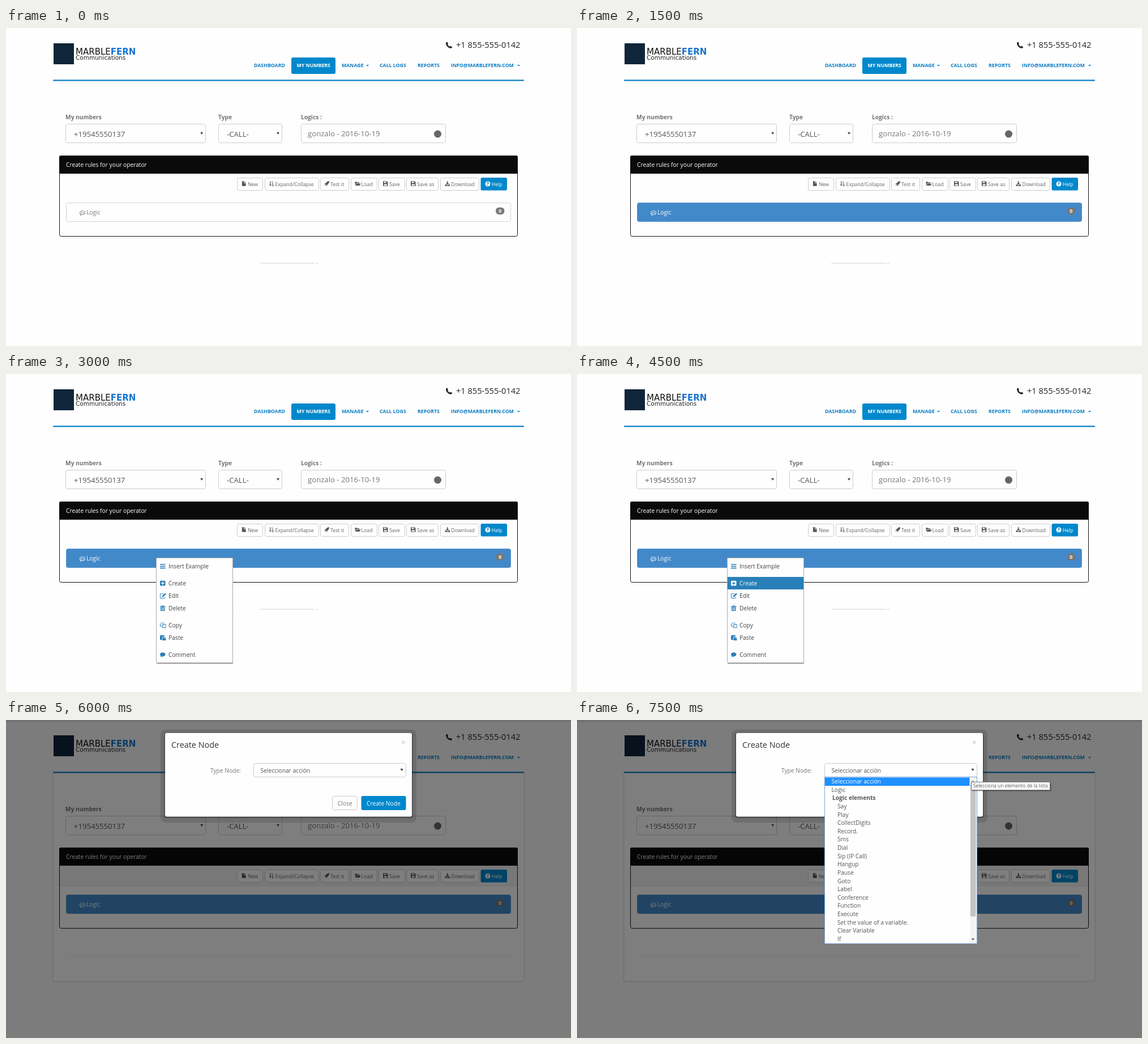
These frames come from a looping animation (998 px wide and 561 px high, 8000 ms). An HTML page:

```html
<!DOCTYPE html>
<html lang="en">
<head>
<meta charset="utf-8">
<title>Call rules</title>
<style>
html, body { margin: 0; width: 100%; height: 100%; overflow: hidden; background: #fefefe; }
svg { display: block; width: 998px; height: 561px; font-family: "Open Sans", sans-serif; }
text { white-space: pre; }
.wordmark { font-family: "DejaVu Sans", sans-serif; }
</style>
</head>
<body>
<svg id="stage" viewBox="0 0 998 561"></svg>
<script>
const BODY = 10.23, SMALL = 8.77, LARGE = 13.15;
const BLUE = '#0088cc', MENU_BLUE = '#2980b9', GREY = '#777';

// Icons live in a box of about 10 by 10 units.
const ICONS = {
  file: 'M1 0H5V4H9V10H1ZM6 0L9 3H6Z',
  sort: 'M2 0H3.4V7H5L2.7 10 .4 7H2ZM6 0H7.5V1.5H6ZM6 2.8H8.3V4.3H6ZM6 5.6H9.2V7.1H6ZM6 8.4H10V9.9H6Z',
  rocket: 'M10 0C6 0 4.3 1.8 3 4L1.3 4.3 0 6.6 2.2 6.2 3.9 7.9 3.5 10 5.8 8.7 6 7C8.2 5.7 10 4 10 0ZM1.7 7L3 8.4 .3 9.7Z',
  folder: 'M0 8V1H3.5L4.5 2.2H9V4H2.6ZM.3 9L3 4.8H12L9.3 9Z',
  save: 'M0 0H8L10 2V10H0ZM2.2 .9V3.7H7.2V.9ZM2 6V9.1H8V6ZM5.3 1.3H6.6V3.2H5.3Z',
  download: 'M4 0H6V4H8.5L5 7.5 1.5 4H4ZM0 6.7H2.5L5 9 7.5 6.7H10V10H0Z',
  bars: 'M0 1H10V2.6H0ZM0 4.3H10V5.9H0ZM0 7.6H10V9.2H0Z',
  plus: 'M1.5 .5H8.5Q10 .5 10 2V8Q10 9.5 8.5 9.5H1.5Q0 9.5 0 8V2Q0 .5 1.5 .5ZM4.2 2.2V4.2H2V5.8H4.2V7.8H5.8V5.8H8V4.2H5.8V2.2Z',
  edit: 'M7 1H1.5Q0 1 0 2.5V8.5Q0 10 1.5 10H7.5Q9 10 9 8.5V6.5L8 7.5V9H1V2H6ZM9.5 0L11.5 2 6 7.3H4V5.3Z',
  trash: 'M3 0H7V1.2H10V2.4H0V1.2H3ZM1 3H9V10H1ZM2.6 4V9H3.5V4ZM4.6 4V9H5.5V4ZM6.5 4V9H7.4V4Z',
  copy: 'M3 0H7V3H11V10H4V7.5H0V3ZM3.2 1L1 3.2V6.6H4V5.4L6.1 3V1ZM7.1 4L5 6.2V9.1H10V4Z',
  paste: 'M0 .8H2.5V0H6V.8H8.5V3H4V9H0ZM4.8 3.8H8V6.5H11V10H4.8ZM8.6 3.8L11 6H8.6Z',
  comment: 'M5 1C8 1 10 2.5 10 4.7S8 8.4 5 8.4L4 8.3C3 9.2 2 9.6 .8 9.7Q1.8 8.7 1.9 7.6C.7 7 0 6 0 4.7 0 2.5 2 1 5 1Z',
  talk: 'M5 1C8 1 10 2.5 10 4.7S8 8.4 5 8.4L4 8.3C3 9.2 2 9.6 .8 9.7Q1.8 8.7 1.9 7.6C.7 7 0 6 0 4.7 0 2.5 2 1 5 1ZM5 1.9C2.5 1.9 .9 3.1 .9 4.7Q.9 6.2 2.8 7.1L2.6 8.2 3.7 7.4C7 7.9 9.1 6.5 9.1 4.7 9.1 3.1 7.5 1.9 5 1.9ZM2.3 4H3.7V5.4H2.3ZM4.3 4H5.7V5.4H4.3ZM6.3 4H7.7V5.4H6.3Z',
  phone: 'M2 0L3.7 2.8 2.6 4Q3.8 6.4 6 7.5L7.2 6.3 10 8Q9.8 10 7.6 10C4 9.8 .2 6 0 2.4Q0 .3 2 0Z'
};

const text = (x, y, value, size = BODY, fill = GREY, weight = 400, extra = '') =>
  `<text x="${x}" y="${y}" font-size="${size}" fill="${fill}" font-weight="${weight}" ${extra}>${value}</text>`;
const rect = (x, y, w, h, fill, extra = '') =>
  `<rect x="${x}" y="${y}" width="${w}" height="${h}" fill="${fill}" ${extra}/>`;
const box = (x, y, w, h, stroke = '#ccc', fill = '#fefefe', radius = 3) =>
  rect(x + .5, y + .5, w - 1, h - 1, fill, `stroke="${stroke}" rx="${radius}"`);
const icon = (name, x, y, fill, scale = .9) =>
  `<path d="${ICONS[name]}" fill="${fill}" fill-rule="evenodd" transform="translate(${x} ${y}) scale(${scale})"/>`;
const arrow = (x, y, fill, half = 2.5, height = 4) =>
  `<path d="M${x - half} ${y}h${2 * half}l${-half} ${height}z" fill="${fill}"/>`;
const group = (id, content) => `<g id="${id}">${content}</g>`;

function header() {
  const links = [[438, 'DASHBOARD'], [593, 'MANAGE'], [660, 'CALL LOGS'], [727, 'REPORTS'], [786, 'INFO@MARBLEFERN.COM']];
  return rect(84, 27, 36, 37, '#10253a') +
    text(123, 47, 'MARBLE<tspan fill="#1674cf" font-weight="700">FERN</tspan>', 15, '#111', 400, 'class="wordmark"') +
    text(123, 56, 'Communications', 10.5, '#222', 400, 'class="wordmark"') +
    icon('phone', 777, 24.5, '#222', 1.12) +
    text(795, 35, '+1 855-555-0142', 14.61, '#222') +
    rect(504, 52, 78, 29, BLUE, 'rx="3"') + text(513.5, 69.2, 'MY NUMBERS', SMALL, '#fff', 700) +
    links.map(([x, label]) => text(x, 69.2, label, SMALL, '#0b7dc4', 700)).join('') +
    arrow(638.5, 65, BLUE, 2.5, 2.8) + arrow(905.5, 65, BLUE, 2.5, 2.8) +
    rect(83, 91.3, 832, 2.2, '#0a80c5', 'rx="1"');
}

function filters() {
  return text(105, 161, 'My numbers', BODY, '#737373', 700) +
    text(375, 161, 'Type', BODY, '#737373', 700) +
    text(521, 161, 'Logics :', BODY, '#737373', 700) +
    box(105, 169, 248, 34) + text(120, 191.7, '+19545550137', LARGE, '#555') + arrow(345.7, 184, '#444') +
    box(375, 169, 113, 34) + text(390, 191.7, '-CALL-', LARGE, '#555') + arrow(480.5, 184, '#444') +
    box(521, 169, 256, 34) + text(533, 190.7, 'gonzalo - 2016-10-19', LARGE) +
    '<circle cx="762.5" cy="187" r="6.5" fill="#666"/>';
}

function toolbar() {
  const buttons = [
    [408, 46, 'file', 416, 427, 'New'], [457, 96, 'sort', 464.5, 475.5, 'Expand/Collapse'],
    [555, 51, 'rocket', 562.5, 573, 'Test it'], [609, 47, 'folder', 616.5, 627.5, 'Load'],
    [658, 47, 'save', 666, 677, 'Save'], [707, 57, 'save', 715, 726, 'Save as'],
    [767, 69, 'download', 775.5, 786.3, 'Download']
  ];
  return buttons.map(([x, w, name, iconX, textX, label]) =>
    box(x, 264, w, 23) + icon(name, iconX, 270.3, '#555', .85) + text(textX, 278.6, label, SMALL, '#666')).join('') +
    rect(838.5, 264, 46.5, 22.5, BLUE, 'rx="2.5"') +
    '<circle cx="851" cy="275" r="4.5" fill="#fff"/>' + text(848.9, 278, '?', 8, BLUE, 800) +
    text(857.7, 278.6, 'Help', SMALL, '#fff');
}

function panel() {
  return box(94, 225, 810, 143, '#111', 'none') +
    '<path d="M94 257V228Q94 225 97 225H901Q904 225 904 228V257Z" fill="#0a0a0a"/>' +
    text(106, 244.7, 'Create rules for your operator', BODY, '#fff') + toolbar();
}

function logicRow(fill, stroke, ink) {
  return box(106, 308, 786, 34, stroke, fill) +
    icon('talk', 130, 321.2, ink, 1) + text(142, 328.7, 'Logic', BODY, ink) +
    rect(865, 316.5, 15.5, 12.5, GREY, 'rx="6.2"') + text(870.2, 326, '0', SMALL, '#fff', 700);
}

const MENU = [
  [339, 'bars', 'Insert Example'], [369, 'plus', 'Create'], [391, 'edit', 'Edit'], [413, 'trash', 'Delete'],
  [443, 'copy', 'Copy'], [465, 'paste', 'Paste'], [495, 'comment', 'Comment']
];
const menuItem = ([y, name, label], iconFill, ink) =>
  icon(name, 272, y - 4.6, iconFill, .95) + text(287, y + 3.7, label, BODY, ink);

function contextMenu() {
  return rect(264.5, 414.5, 138, 1, '#ddd') + rect(264.5, 459.5, 138, 1, '#e4e4e4') +
    rect(266, 326, 135, 185, '#888', 'rx="1"') + box(265, 324, 136, 186, '#aaa', '#fefefe', 1) +
    MENU.map(item => menuItem(item, MENU_BLUE, '#444')).join('');
}

function modal() {
  return rect(0, 0, 998, 561, '#000', 'opacity=".5"') +
    rect(273, 17, 452, 164, '#000', 'opacity=".13" rx="9"') +
    rect(279.5, 23, 439, 150, '#000', 'opacity=".35" rx="4"') +
    rect(281, 23, 436, 147.5, '#fefefe', 'rx="3"') +
    text(292, 48.8, 'Create Node', 14.4, '#333') + text(698.3, 44.2, '×', 12.5, '#bbb') +
    text(361, 92.8, 'Type Node:') +
    box(437, 76, 270, 25) + text(449.5, 92.8, 'Seleccionar acción', BODY, '#555') + arrow(699, 86, '#333') +
    box(576, 134, 45, 25) + text(585.7, 150.5, 'Close') +
    rect(627.5, 134, 79, 25, BLUE, 'rx="3"') + text(637, 150.5, 'Create Node', BODY, '#fff');
}

function dropdown() {
  const children = ['Say', 'Play', 'CollectDigits', 'Record.', 'Sms', 'Dial', 'Sip (IP Call)', 'Hangup', 'Pause', 'Goto',
    'Label', 'Conference', 'Function', 'Execute', 'Set the value of a variable.', 'Clear Variable', 'If'];
  const baseline = row => 112.2 + row * 14.61;
  return box(437, 100, 270, 295, '#7fa6dc', '#fefefe', 0) +
    rect(438, 101.5, 255.5, 14.6, '#1e90ff') + text(449.5, baseline(0), 'Seleccionar acción', BODY, '#fff') +
    text(449.5, baseline(1), 'Logic', BODY, '#555') + text(451, baseline(2), 'Logic elements', BODY, '#555', 700) +
    children.map((label, i) => text(460, baseline(i + 3), label, BODY, '#555')).join('') +
    rect(694, 101, 12, 293, '#f3f3f3') + rect(695, 114, 9.5, 232.5, '#c4c4c4') +
    arrow(699.5, 109, '#aaa', 2.5, -3) + arrow(699.5, 385.5, '#444', 2.8, 3) +
    rect(698, 111, 139.5, 14.5, '#000', 'opacity=".35"') + box(696, 109, 140, 15, '#777', '#fff', 0) +
    text(700, 119.4, 'Selecciona un elemento de la lista', 8.35, '#555');
}

// Faint page surfaces that only show while the page is dimmed.
const surfaces = rect(0, 0, 998, 561, '#fafafa') + rect(0, 0, 998, 3, '#e2e2e2') +
  rect(82.5, 93, 833, 368, '#fdfdfd', 'stroke="#e6e6e6" stroke-width="2" rx="3"') +
  rect(95, 257, 808, 36, '#f2f2f2') + rect(95, 292.5, 808, 1, '#e4e4e4') + rect(107, 414.5, 785, 1, '#ededed');

const stage = document.getElementById('stage');
stage.innerHTML =
  group('surfaces', surfaces) + header() + filters() + panel() +
  group('rule', rect(449, 414.5, 96, 1, '#d5d5d5') + rect(547, 414.5, 5, 1, '#d5d5d5')) +
  group('idleRow', logicRow('#fefefe', '#d4d4d4', GREY)) +
  group('activeRow', logicRow('#4289ca', '#5b97cd', '#fff')) +
  group('menu', contextMenu()) +
  group('menuHover', rect(266, 358, 134, 22, MENU_BLUE) + menuItem(MENU[1], '#fff', '#fff')) +
  group('modal', modal()) + group('dropdown', dropdown());

// Visible span of each layer in milliseconds.
const LOOP = 8000;
const SPANS = {
  surfaces: [6000, LOOP], rule: [0, 6000], idleRow: [0, 1500], activeRow: [1500, LOOP],
  menu: [3000, 6000], menuHover: [4500, 6000], modal: [6000, LOOP], dropdown: [7500, LOOP]
};
const layers = Object.entries(SPANS).map(([id, span]) => [document.getElementById(id), span]);

function draw() {
  const time = performance.now() % LOOP;
  for (const [layer, [start, end]] of layers)
    layer.style.display = time >= start && time < end ? '' : 'none';
  requestAnimationFrame(draw);
}
draw();
</script>
</body>
</html>
```
